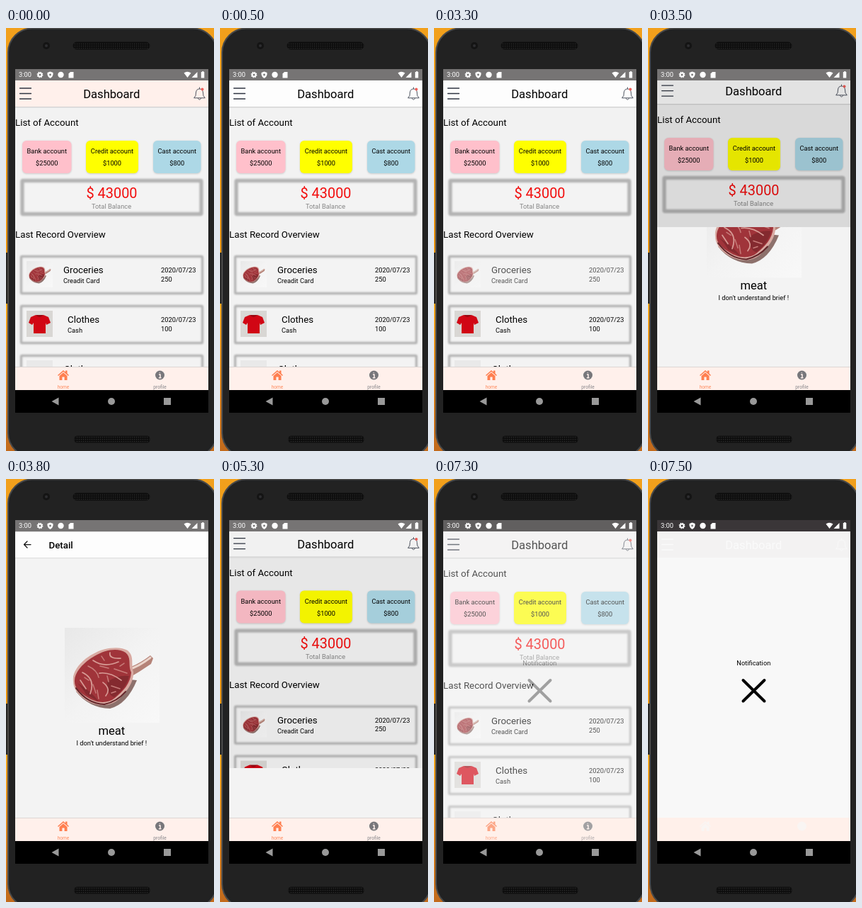
These frames come from a looping animation (294x597 px, 8000 ms). An HTML page:

```html
<!DOCTYPE html>
<html lang="en">
<head>
<meta charset="utf-8">
<title>Dashboard</title>
<style>
html, body { margin: 0; width: 100%; height: 100%; overflow: hidden; background: #f09a18; }
svg { display: block; width: 100%; height: 100%; font-family: Roboto, sans-serif; font-size: 9.3px; }
.m { text-anchor: middle; }
.big { font-size: 16.6px; }
.mid { font-size: 13.3px; }
.sum { font-size: 19.9px; fill: #f20d0d; }
.tiny { font-size: 6.6px; }
.line { fill: none; stroke-linecap: round; stroke-linejoin: round; }
</style>
</head>
<body>
<svg viewBox="0 0 294 597">
<defs>
  <linearGradient id="bg" x2="0" y2="1">
    <stop offset="0" stop-color="#f2a01c"/><stop offset=".5" stop-color="#e8920f"/>
    <stop offset=".66" stop-color="#f5a51a"/><stop offset=".85" stop-color="#d9801a"/>
    <stop offset="1" stop-color="#c26a1c"/>
  </linearGradient>
  <linearGradient id="photo" x2="1" y2="1">
    <stop offset="0" stop-color="#e8e8e8"/><stop offset=".5" stop-color="#f3f3f3"/><stop offset="1" stop-color="#f8f8f8"/>
  </linearGradient>
  <pattern id="mesh" width="3" height="3" patternUnits="userSpaceOnUse">
    <rect width="3" height="3" fill="#0c0c0c"/><circle cx="1.5" cy="1.5" r=".8" fill="#2e2e2e"/>
  </pattern>
  <filter id="soft"><feGaussianBlur stdDeviation=".8"/></filter>
  <clipPath id="stack"><rect x="13" y="74" width="273" height="405"/></clipPath>
  <clipPath id="reveal"><rect id="window" x="13" width="273" height="405"/></clipPath>

  <g id="steak">
    <rect width="134" height="134" fill="url(#photo)"/>
    <path d="M16 90Q34 113 64 114Q88 108 102 74L60 70Z" fill="#8d716c"/>
    <path d="M88 57Q104 52 121 39L125 43L122 51Q106 62 90 71Z" fill="#b58378"/>
    <path d="M90 59Q106 54 121 42" class="line" stroke="#ecd5cb" stroke-width="3"/>
    <path d="M12 75C10 60 26 44 40 37C54 28 78 25 89 32C99 41 93 50 97 62C98 78 86 92 75 102C62 112 44 111 30 102C18 94 12 86 12 75Z" fill="#d9aaa2"/>
    <path d="M14 76C13 62 29 47 42 40C58 30 76 28 86 35C95 43 89 52 94 63C93 79 82 90 71 99C60 108 44 106 32 98C21 91 14 85 14 76Z" fill="#a0343a"/>
    <path d="M60 76Q76 66 91 68Q88 84 70 98Q60 95 60 76M18 78Q26 86 30 94L48 104Q38 90 18 78" fill="#842a2f"/>
    <path d="M25 63Q44 72 36 93M40 46Q56 57 76 48M49 64Q64 62 80 74M58 96Q66 86 54 77M64 35Q62 44 79 43M22 74L30 86" class="line" stroke="#d79b95" stroke-width="1.700"/>
    <path d="M33 54Q46 60 48 70M66 82L78 86M46 88L48 100M70 58L88 64M28 70L34 74M52 40L56 46M40 80L44 92M60 68L62 76M78 54L84 50M66 92L72 90M50 54L62 57" class="line" stroke="#c77c79" stroke-width="1.500"/>
    <path d="M16 85Q32 107 56 108Q74 104 86 90" class="line" stroke="#62262a" stroke-width="2"/>
  </g>
  <g id="shirt">
    <rect width="37" height="37" fill="#d9d7d4"/>
    <path d="M13 6Q18 9 24 6L31 9L34 17L28 20L27 17V32H10V17L8 20L3 17L6 9Z" fill="#d10614"/>
    <path d="M13 6Q18 12 24 6" fill="#9a0710"/>
  </g>
  <rect id="blank" width="37" height="37" fill="#e9e9e9"/>

  <path id="home" d="M-8 0L0-7L3-4.5V-6.5H5.5V-2.5L8 0L7 1L0-5L-7 1ZM-5.5 1L0-3.7L5.5 1V7H1.6V2.5H-1.6V7H-5.5Z"/>
  <path id="menu" d="M19.500 85H35.500M19.500 92.500H35.500M19.500 100H35.500" class="line" stroke-width="1.300"/>
  <path id="bell" d="M266 98.500Q269 96 268.500 91Q269 86 273.500 86Q278 86 278.500 91Q278 96 281 98.500ZM271.500 99.500Q273.500 103 275.500 99.500M273.500 85.500V84" class="line" stroke-width=".9"/>
</defs>

<rect width="294" height="597" fill="url(#bg)"/>
<rect y="317" width="4" height="72" fill="#252525"/>
<rect x="3" y=".5" width="295" height="605" rx="34" fill="#212223" stroke="#4a4a4a" stroke-width="2"/>
<rect x="6" y="4" width="289" height="597" rx="31" fill="#222"/>
<circle cx="57" cy="25" r="5" fill="#141414"/><circle cx="57" cy="25" r="2" fill="#2d2d30"/>
<rect x="95" y="20" width="108" height="10" rx="5" fill="url(#mesh)" stroke="#111"/>
<rect x="97" y="576" width="106" height="9" rx="3" fill="url(#mesh)" stroke="#111"/>

<rect x="13" y="58" width="273" height="485"/>
<rect x="13" y="58" width="273" height="16" fill="#767474"/>

<g clip-path="url(#stack)">
  <rect x="13" y="74" width="273" height="405" fill="#f2f2f2"/>
  <g id="dash">
    <rect x="13" y="74" width="273" height="413" fill="#f2f2f2"/>
    <rect id="bar" x="13" y="74" width="273" height="37"/>
    <path d="M13 111.500H286" stroke="#d2d2d2"/>
    <path d="M13 112.500H286" stroke="#e6e6e6"/>
    <use href="#menu" stroke="#2f3542"/>
    <use href="#bell" stroke="#3c4250"/>
    <circle cx="277.500" cy="86.500" r="2" fill="#f0605a"/>
    <text class="m big" x="149.300" y="99">Dashboard</text>
    <text class="mid" x="13" y="138">List of Account</text>
    <g id="accounts"></g>
    <g id="total"></g>
    <text class="m sum" x="149.500" y="240">$ 43000</text>
    <text class="m" x="149" y="255" fill="#858585">Total Balance</text>
    <text class="mid" x="13" y="296">Last Record Overview</text>
    <g id="rows"></g>
    <rect id="scroll" x="283" y="313" width="3" height="49" fill="#9a9a9a"/>
  </g>
  <rect id="shade" x="13" y="74" width="273" height="405"/>
  <g clip-path="url(#reveal)">
    <g id="detail">
      <rect x="13" y="74" width="273" height="425" fill="#f3f3f3"/>
      <rect x="13" y="74" width="273" height="37" fill="#fdfdfd"/>
      <path d="M13 111.500H286" stroke="#dcdcdc"/>
      <circle id="ripple" cx="30" cy="92.500" r="14"/>
      <path d="M35 92.500H25.500M30 88L25.500 92.500L30 97" class="line" stroke="#111" stroke-width="1.300"/>
      <text class="mid" x="60.500" y="97.500" font-weight="500">Detail</text>
      <use href="#steak" x="83" y="210"/>
      <text class="m big" x="149.300" y="361">meat</text>
      <text class="m" x="149.300" y="376">I don't understand brief !</text>
    </g>
  </g>
</g>

<rect x="13" y="478" width="273" height="33" fill="#fff0eb"/>
<path d="M13 478.500H286" stroke="#dcd6d4"/>
<use href="#home" x="81" y="490" fill="#ff7f50"/>
<text class="m tiny" x="81" y="508.500" fill="#ff8a5e">home</text>
<circle cx="217.500" cy="490" r="6.500" fill="#77777b"/>
<path d="M216 489H218V493.500M215.800 493.700H219.500M217.300 486.300V487" stroke="#fff0eb" stroke-width="1.500" fill="none"/>
<text class="m tiny" x="217.500" y="508.500" fill="#86868a">profile</text>

<g fill="#999">
  <path d="M64.500 527L74.500 521.500V532.500Z"/><circle cx="149" cy="527" r="5"/><rect x="223" y="522" width="10" height="10"/>
</g>

<g id="modal">
  <rect x="13" y="58" width="273" height="16" fill="#3a3638"/>
  <rect x="13" y="74" width="273" height="405" fill="#f8f8f8"/>
  <rect x="13" y="74" width="273" height="37" fill="#f3f2f2"/>
  <rect x="13" y="478" width="273" height="33" fill="#fff0ea"/>
  <g fill="#fafafa" stroke="#fafafa">
    <use href="#menu"/><use href="#bell"/>
    <text class="m big" x="149.300" y="99" stroke="none">Dashboard</text>
  </g>
  <g fill="#f9f5f3"><use href="#home" x="81" y="490"/><circle cx="217.500" cy="490" r="6.500"/></g>
  <text class="m" x="149.300" y="263">Notification</text>
  <path d="M134.500 284L164.500 313.500M164.500 284L134.500 313.500" class="line" stroke="#000" stroke-width="4"/>
</g>

<g fill="#fff">
  <text x="18" y="69.300">3:00</text>
  <circle cx="48" cy="66" r="2.500" fill="none" stroke="#fff" stroke-width="2"/>
  <circle cx="48" cy="66" r="3.800" fill="none" stroke="#fff" stroke-width="1.200" stroke-dasharray="1.500 1.480"/>
  <path d="M62.500 61.500L66.500 63V66Q66 69 62.500 71Q59 69 58.500 66V63Z"/>
  <circle cx="62.500" cy="66" r="1.400" fill="#777"/>
  <circle cx="77.500" cy="66" r="4.200"/>
  <path d="M91 62H95.500V70.500H88.500V64.500Z"/>
  <path d="M251.500 63.500Q256.500 59.800 261.500 63.500L256.500 70Z"/>
  <path d="M270.500 62V70H262.500Z"/>
  <path d="M276.500 62H277.300V61H279.300V62H280.300V70.500H275.800V62Z"/>
</g>
</svg>
<script>
const $ = id => document.getElementById(id);
const H = 405, TOP = 74, SLIDE = 425;

const frame = (x, y, w, h, wide) =>
  `<rect x="${x}" y="${y}" width="${w}" height="${h}" rx="1" fill="#f3f3f3" stroke="#b4b4b4" stroke-width="${wide}" filter="url(#soft)"/>`;

const account = ([name, sum, x, w, color]) =>
  `<rect x="${x}" y="159.5" width="${w}" height="46.5" rx="6" fill="#ccc" filter="url(#soft)"/>
   <rect x="${x}" y="159" width="${w}" height="46" rx="6" fill="${color}"/>
   <text class="m" x="${x + w / 2}" y="177">${name}</text>
   <text class="m" x="${x + w / 2}" y="194">$${sum}</text>`;

const row = ([title, kind, sum, x, art], i) =>
  `<g transform="translate(0 ${i * 70})">${frame(21.5, 322.5, 256, 52, 3.4)}
   <g class="content"><g transform="translate(29 329)">${art}</g>
   <text class="mid" x="${x}" y="346">${title}</text><text x="${x}" y="360">${kind}</text>
   <text x="219" y="345">2020/07/23</text><text x="219" y="357.500">${sum}</text></g></g>`;

$("accounts").innerHTML = [
  ["Bank account", 25000, 23, 69.5, "#ffc0cb"],
  ["Credit account", 1000, 113, 74, "#ff0"],
  ["Cast account", 800, 208, 67.5, "#add8e6"]
].map(account).join("");
$("total").innerHTML = frame(23, 215.5, 253, 47, 5.4);
$("rows").innerHTML = [
  ["Groceries", "Creadit Card", 250, 81, '<use href="#steak" transform="scale(.276)"/>'],
  ["Clothes", "Cash", 100, 87, '<use href="#shirt"/>'],
  ["Clothes", "Cash", 100, 82, '<use href="#blank"/>']
].map(row).join("");
const pressed = document.querySelector(".content");

const clamp = v => Math.min(1, Math.max(0, v));
const cubic = (s, a, b) => 3 * s * (1 - s) ** 2 * a + 3 * s * s * (1 - s) * b + s ** 3;

// cubic-bezier(.208, .82, .25, 1)
function ease(x) {
  if (x <= 0 || x >= 1) return clamp(x);
  let lo = 0, hi = 1;
  for (let i = 0; i < 24; i++) {
    const s = (lo + hi) / 2;
    if (cubic(s, .208, .25) < x) lo = s; else hi = s;
  }
  return cubic(lo, .82, 1);
}

function draw(now) {
  // The screen refreshes ten times a second.
  const t = Math.floor(now % 8000 / 100) * 100;
  const p = ease((t - 3443) / SLIDE) - ease((t - 5167) / SLIDE);
  const drop = H * (1 - p);

  $("bar").setAttribute("fill", t < 500 ? "#fff0eb" : t < 5600 ? "#fdfdfd" : "#f5f5f5");
  $("scroll").setAttribute("opacity", t >= 1700 && t < 3300 ? 1 : 0);
  pressed.setAttribute("opacity", t < 2800 ? 1 : t < 3300 ? .3 : clamp(.3 + (t - 3200) * .0035));

  $("dash").setAttribute("transform", `translate(0 ${-.02 * H * p})`);
  $("shade").setAttribute("opacity", .1 * clamp(p / .36));
  $("window").setAttribute("y", TOP + drop);
  $("detail").setAttribute("transform", `translate(0 ${drop * .041})`);
  $("ripple").setAttribute("opacity", t >= 4800 ? .12 * clamp((t - 4700) / 200) : 0);
  $("modal").setAttribute("opacity", clamp((t - 7200) / 300));
}

const start = performance.now();
function tick() {
  draw(performance.now() - start);
  requestAnimationFrame(tick);
}
tick();
</script>
</body>
</html>
```
